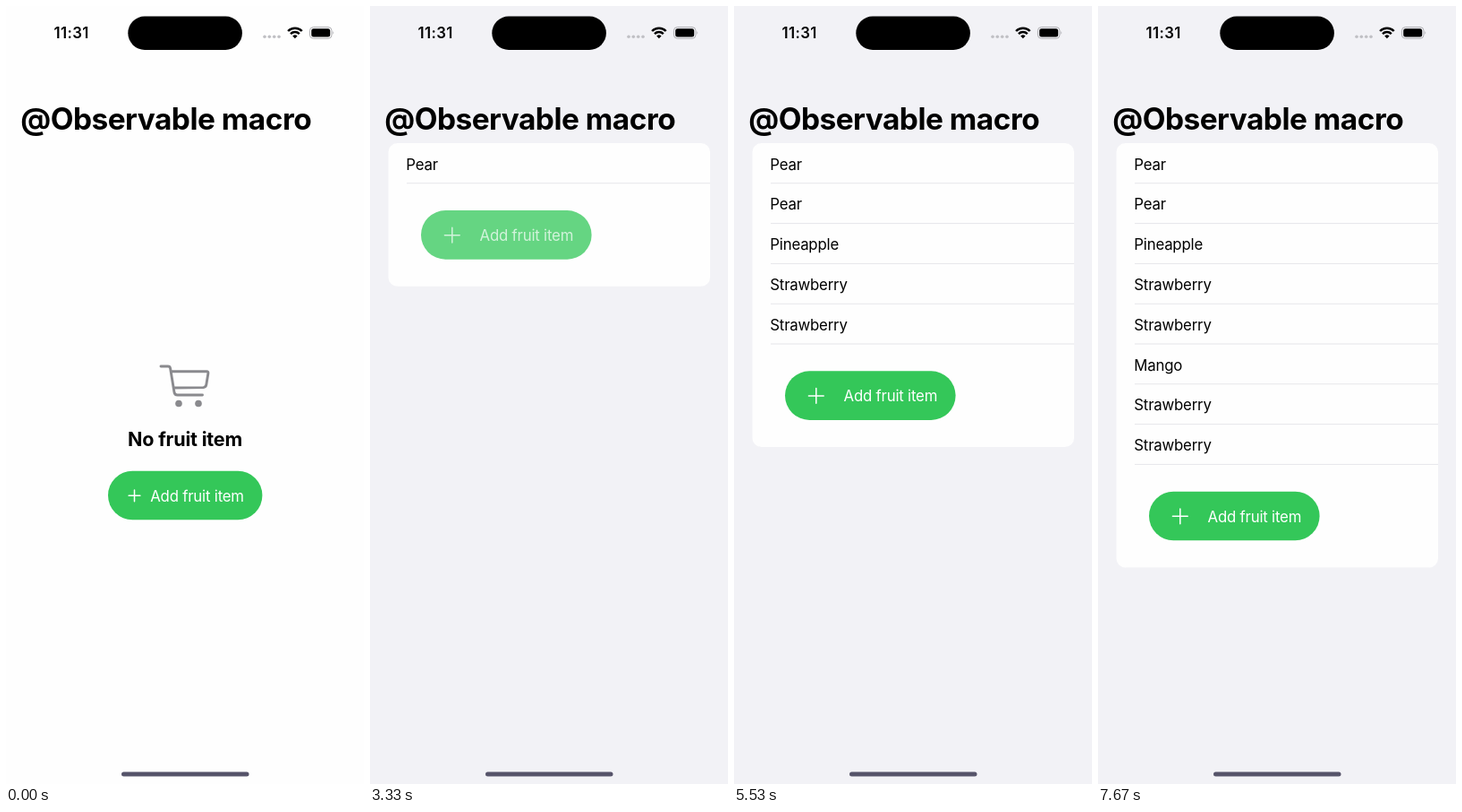
An HTML page that plays this animation: 400 by 868 pixels, repeating every 8.39 s.

```html
<!DOCTYPE html>
<html lang="en">
<head>
<meta charset="utf-8">
<title>Fruit list</title>
<style>
  html, body { margin: 0; width: 100%; height: 100%; overflow: hidden; }
  svg { display: block; width: 400px; height: 868px; }
  text {
    font-family: Inter, Roboto, sans-serif;
    font-size: 16.8px;
    font-optical-sizing: none;
    letter-spacing: -.2px;
  }
  .time { font-weight: 600; letter-spacing: .4px; }
  .title { font-size: 33.4px; font-weight: 700; letter-spacing: -.48px; }
  .notice { font-size: 21.6px; font-weight: 700; letter-spacing: -.2px; }
  .line { fill: none; stroke-linecap: round; stroke-linejoin: round; }
</style>
</head>
<body>
<svg viewBox="0 0 400 868">
  <rect id="bg" width="400" height="868"/>

  <text class="time" x="73.2" y="36" text-anchor="middle">11:31</text>
  <rect x="136.3" y="11.5" width="127.6" height="37.4" rx="18.7"/>
  <g fill="#c0c0c4">
    <circle cx="289" cy="34.2" r="1.8"/>
    <circle cx="294.3" cy="34.2" r="1.8"/>
    <circle cx="299.7" cy="34.2" r="1.8"/>
    <circle cx="305" cy="34.2" r="1.8"/>
  </g>
  <g fill="none" stroke="#000" stroke-width="2.5">
    <path d="M315.1 28 A10.8 10.8 0 0 1 330.7 28"/>
    <path d="M318 31.2 A6.8 6.8 0 0 1 327.8 31.2"/>
  </g>
  <path d="M322.9 36.2 L320.2 33.4 A4 4 0 0 1 325.6 33.4 Z"/>
  <rect x="339.4" y="23.6" width="24.6" height="12.6" rx="4" fill="none" stroke="#aeaeb2"/>
  <path d="M365.4 28 Q367.2 29.9 365.4 31.8 Z" fill="#aeaeb2"/>
  <rect x="341.2" y="25.3" width="21" height="9.2" rx="2.5"/>

  <text class="title" x="16.2" y="137.6">@Observable macro</text>

  <g id="empty">
    <g class="line" stroke="#8a8a8e" stroke-width="2.9">
      <path d="M173 402 H181 Q183.2 402 183.6 404.2 L188 431 Q188.5 434 191.5 434 H219.5"/>
      <path d="M184.4 407.8 H224.2 Q226.2 407.8 225.9 409.7 L223.8 422.6 Q223.3 425.4 220.5 425.6 L187.4 426"/>
    </g>
    <g fill="#8a8a8e">
      <circle cx="193" cy="443.5" r="3.8"/>
      <circle cx="215" cy="443.5" r="3.8"/>
    </g>
    <text class="notice" x="200" y="491.3" text-anchor="middle">No fruit item</text>
  </g>

  <g id="list">
    <rect id="card" x="20.5" y="153" width="359.5" rx="10" fill="#fefefe"/>
    <g id="rows"></g>
  </g>

  <g id="button">
    <rect id="pill" height="54.6" rx="27.3"/>
    <path id="plus" class="line" stroke-width="1.5"/>
    <text id="label" y="34">Add fruit item</text>
  </g>

  <rect x="129" y="854.5" width="142.5" height="5" rx="2.5" fill="#56546a"/>
</svg>
<script>
const LOOP = 8390, ROW = 44.8;
const FRUITS = ['Pear', 'Pear', 'Pineapple', 'Strawberry', 'Strawberry', 'Mango', 'Strawberry', 'Strawberry'];
const ADDED = [1870, 3400, 4200, 4870, 5530, 6270, 6930, 7670];
const PRESSED = [[1670, 1870], [3330, 3400], [4130, 4200], [4800, 4870], [5470, 5530], [6200, 6270], [6870, 6930]];

const $ = id => document.getElementById(id);

function set(el, attrs) {
  for (const name in attrs) el.setAttribute(name, attrs[name]);
  return el;
}

function add(parent, tag, attrs) {
  const el = document.createElementNS('http://www.w3.org/2000/svg', tag);
  return parent.appendChild(set(el, attrs));
}

const show = (el, on) => set(el, { display: on ? 'inline' : 'none' });

const rows = FRUITS.map((name, i) => {
  const row = add($('rows'), 'g', { transform: `translate(0 ${153 + i * ROW})` });
  add(row, 'text', { x: 40.3, y: 29.6 }).textContent = name;
  add(row, 'rect', { x: 41, y: 44.3, width: 339, height: 1, fill: '#e6e6ea' });
  return row;
});

function drawButton(count, pressed) {
  const inList = count > 0;
  const ink = pressed ? '#d2f3db' : '#fff';
  const arm = inList ? 8.4 : 6.4;
  const x = inList ? 57 : 114;
  const y = inList ? 183.3 + count * ROW : 518.7;
  set($('button'), { transform: `translate(${x} ${y})` });
  set($('pill'), { width: inList ? 190.6 : 172.4, fill: pressed ? '#65d582' : '#34c759' });
  set($('plus'), {
    d: `M${-arm} 0 H${arm} M0 ${-arm} V${arm}`,
    transform: `translate(${inList ? 34.8 : 29.5} 27.6)`,
    stroke: ink
  });
  set($('label'), { x: inList ? 65.5 : 47.2, fill: ink });
}

let last = '';

function draw(now) {
  const t = now % LOOP;
  const count = ADDED.filter(at => t >= at).length;
  const pressed = PRESSED.some(([from, to]) => t >= from && t < to);
  const state = `${count} ${pressed}`;
  if (state === last) return;
  last = state;
  const inList = count > 0;
  set($('bg'), { fill: inList ? '#f2f2f6' : '#fefefe' });
  show($('empty'), !inList);
  show($('list'), inList);
  set($('card'), { height: 115 + count * ROW });
  rows.forEach((row, i) => show(row, i < count));
  drawButton(count, pressed);
}

const start = performance.now();

function tick() {
  draw(performance.now() - start);
  requestAnimationFrame(tick);
}

tick();
</script>
</body>
</html>
```
